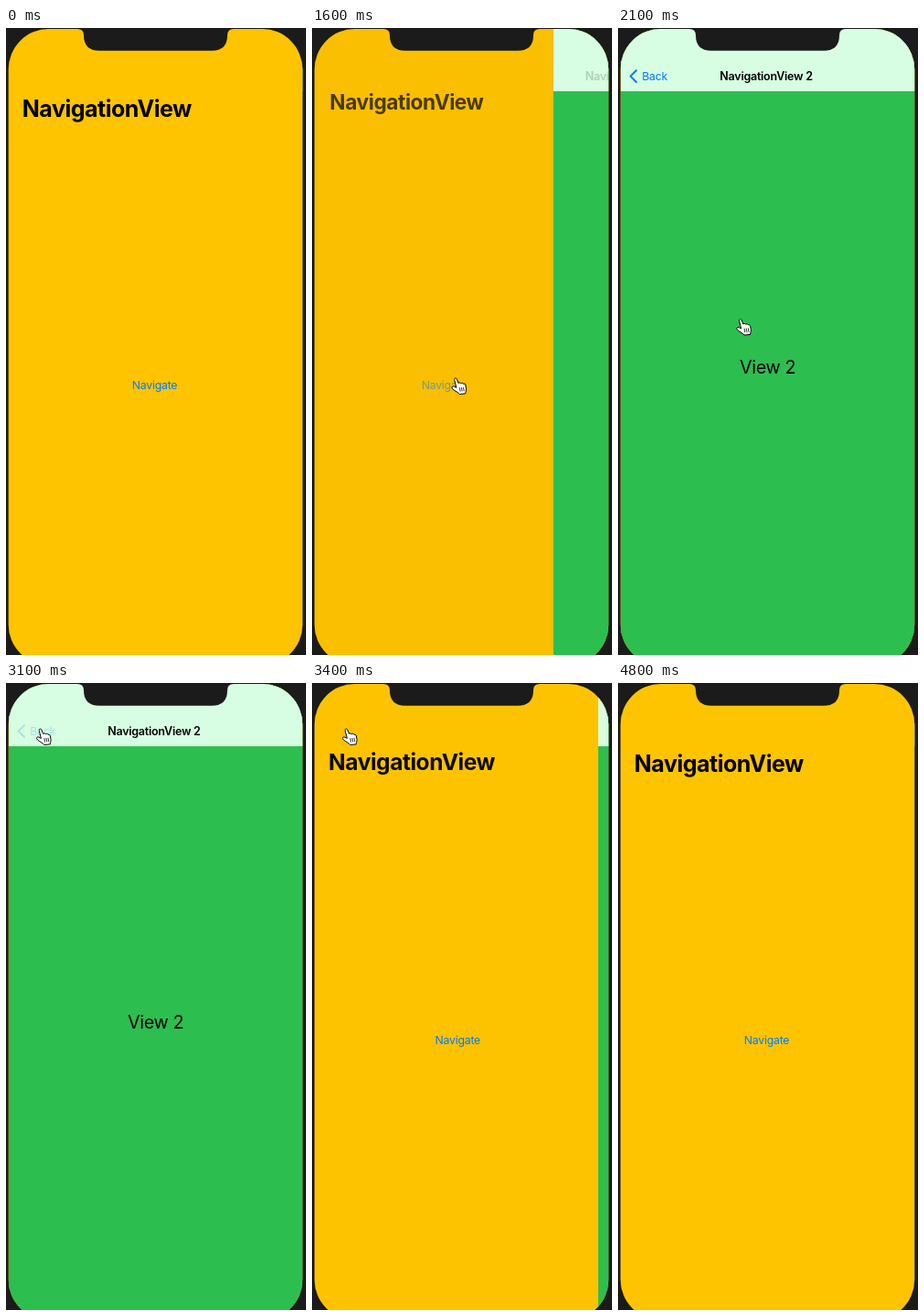
Recreate the animation shown at these times as an HTML page. Size 328x684 px, loop 5300 ms.

```html
<!DOCTYPE html>
<html lang="en">
<head>
<meta charset="utf-8">
<title>Navigation push and pop</title>
<style>
  html, body { margin: 0; width: 100%; height: 100%; overflow: hidden; background: #1b1b1b; }
  svg { display: block; }
  text { font-family: Inter, "Liberation Sans", sans-serif; letter-spacing: -.02em; white-space: pre; }
  .body { font-size: 12.3px; fill: #007aff; }
</style>
</head>
<body>
<svg width="328" height="684" viewBox="0 0 328 684">
  <defs>
    <clipPath id="screen"><rect x="2.7" y="1" width="321.5" height="694" rx="44"/></clipPath>
  </defs>
  <rect width="328" height="684" fill="#1b1b1b"/>
  <g clip-path="url(#screen)">
    <rect width="328" height="684" fill="#ffc400"/>
    <g id="first"><text id="link" class="body" x="137.8" y="393.5">Navigate</text></g>
    <rect id="dim" width="328" height="684"/>
    <g id="second">
      <rect x="3" width="322" height="684" fill="#2dbe50"/>
      <rect x="3" width="322" height="69" fill="#d7fee2"/>
      <text x="133" y="377" font-size="19.8">View 2</text>
    </g>
    <text id="large" font-size="25" font-weight="700">NavigationView</text>
    <text id="inline" y="57" font-size="12.5" font-weight="600">NavigationView 2</text>
    <path id="chevron" d="M20 46.2L13.6 52.6L20 59" fill="none" stroke="#007aff" stroke-width="2" stroke-linecap="round" stroke-linejoin="round"/>
    <text id="back" class="body">Back</text>
  </g>
  <path d="M78 0V1Q85 1 85 8Q85 24.7 102 24.7H225Q242 24.7 242 8Q242 1 249 1V0Z" fill="#1b1b1b"/>
  <g id="hand" stroke="#000" stroke-linejoin="round" stroke-linecap="round">
    <path fill="#fff" d="M.2 1.8C-.4 -.2 2.2 -.7 2.9 1.1L4.6 5.5C5.6 4.5 6.9 4.9 7.3 5.8C8.3 4.9 9.6 5.2 10 6.3C11.2 5.8 12.2 6.6 12.4 8L13 11.2C13.3 13.7 12.4 14.7 12.3 16.8L5.8 17.5C4.5 15.5 1 14.2 -1.5 12C-3.4 10.2 -2 8.2 -.2 9L2 10.2Z"/>
    <path fill="none" stroke-width=".8" d="M5.9 10.6l.6 3.6M8 10.4l.6 3.6M10.1 10.2l.6 3.6"/>
  </g>
</svg>
<script>
const LOOP = 5300, TICK = 100, WIDTH = 321;
const TAP = 1500, PUSH = 1556, PRESS = 3100, POP = 3110;
const SHOW = 500, HIDE = 4800;

// pointer glides: start, duration, destination
const glides = [
  { at: 500, ms: 500, x: 154, y: 378 },
  { at: 1100, ms: 200, x: 155.5, y: 382 },
  { at: 2000, ms: 700, x: 36, y: 50 },
  { at: 4600, ms: 100, x: 221, y: 80 }
];

const [first, link, dim, second, large, inline, chevron, back, hand] =
  ["first", "link", "dim", "second", "large", "inline", "chevron", "back", "hand"]
    .map(id => document.getElementById(id));

const clamp = v => Math.min(1, Math.max(0, v));
const mix = (a, b, f) => a + (b - a) * f;
const easeOut = f => 1 - (1 - f) ** 1.4;
const fade = (el, v) => el.setAttribute("opacity", clamp(v));
const place = (el, x, y, scale = 1) =>
  el.setAttribute("transform", `translate(${x} ${y}) scale(${scale})`);

// critically damped spring, from 1 down to 0
function spring(ms) {
  const s = Math.max(0, ms) * .018;
  return (1 + s) * Math.exp(-s);
}

function pointer(t) {
  let x = 230, y = 640;
  for (const g of glides) {
    const f = easeOut(clamp((t - g.at) / g.ms));
    x = mix(x, g.x, f);
    y = mix(y, g.y, f);
  }
  return [x, y];
}

function draw(t) {
  const rest = t < PRESS ? spring(t - PUSH) : 1 - spring(t - POP);
  const done = 1 - rest;
  const pressed = t >= PRESS ? .22 : 1;

  place(first, -.3 * WIDTH * done, 0);
  fade(link, t >= TAP && t < PRESS ? mix(.4, 1, done) : 1);
  fade(dim, .12 * done);
  place(second, Math.round(WIDTH * rest), 0);

  place(large, mix(17.8, 26, done), mix(96.6, 57, done), mix(1, .52, done));
  fade(large, 1 - 1.6 * done);
  place(inline, 111.2 + .72 * WIDTH * rest, 0);
  fade(inline, done);
  place(back, mix(56.2, 26.2, done), mix(99, 57, done), mix(2.04, 1, done));
  fade(back, clamp((done - .4) * 1.8) * pressed);
  fade(chevron, clamp((done - .75) * 4) * pressed);

  fade(hand, t >= SHOW && t < HIDE ? 1 : 0);
  place(hand, ...pointer(t));
}

function frame() {
  const t = performance.now() % LOOP;
  draw(Math.floor(t / TICK) * TICK);
  requestAnimationFrame(frame);
}
frame();
</script>
</body>
</html>
```
